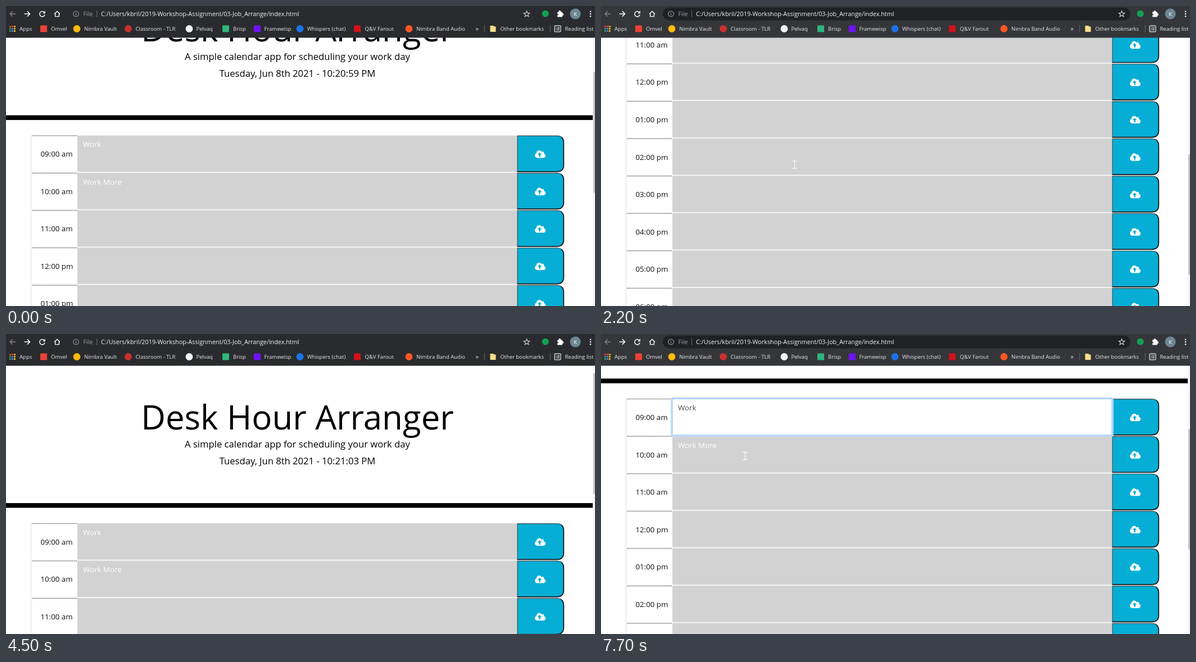
Write an HTML page that moves like this. It is 1048x534 px and loops after 8 s.

```html
<!DOCTYPE html>
<html lang="en">
<head>
<meta charset="utf-8">
<title>Day planner</title>
<style>
  html, body { margin: 0; width: 100%; height: 100%; overflow: hidden; background: #fff; }
  svg { display: block; width: 1048px; height: 534px; font-family: "Open Sans", "Noto Sans", sans-serif; }
</style>
</head>
<body>
<svg id="stage" viewBox="0 0 1048 534"></svg>
<script>
const LOOP = 8000, STEP = 100;
const ROW = 66.55, FIRST_ROW = 337, MID = 518.5;

const rect = (x, y, w, h, fill, more = '') =>
  `<rect x="${x}" y="${y}" width="${w}" height="${h}" fill="${fill}" ${more}/>`;
const circle = (x, y, r, fill, more = '') =>
  `<circle cx="${x}" cy="${y}" r="${r}" fill="${fill}" ${more}/>`;
const line = (d, color, width, more = '') =>
  `<path d="${d}" fill="none" stroke="${color}" stroke-width="${width}" ${more}/>`;
const text = (x, y, size, fill, str, more = '') =>
  `<text x="${x}" y="${y}" font-size="${size}" fill="${fill}" ${more}>${str}</text>`;
const centered = (y, size, str, id) =>
  text(MID, y, size, '#000', str, `text-anchor="middle" id="${id}"`);

// Planner rows
const cloud = `<g id="cloud" fill="#fff" transform="translate(941 25.6) scale(.0297)">
  <circle cx="256" cy="192" r="160"/><circle cx="448" cy="192" r="96"/>
  <circle cx="144" cy="336" r="144"/><circle cx="512" cy="352" r="128"/>
  <rect x="144" y="230" width="368" height="250"/>
  <path d="M288 146L414 288H328V416H248V288H162z" fill="#06aed5"/></g>`;

const saveButton =
  `<path d="M910 .6H980Q992.4 .6 992.4 13V52Q992.4 64.4 980 64.4H910z" fill="#06aed5" stroke="#3b4a4f" stroke-width="1.2"/>` +
  line('M909.6 64.4H980Q992.3 64.4 992.3 52V13Q992.3 6 988 3', '#10181b', 1.7) + cloud;

function hourLabel(i) {
  const h = 9 + i;
  return String(h > 12 ? h - 12 : h).padStart(2, '0') + ':00 ' + (h < 12 ? 'am' : 'pm');
}

function row(i) {
  const note = ['Work', 'Work More'][i] || '';
  return `<g transform="translate(0 ${FIRST_ROW + i * ROW})">` +
    line('M44.6 1V64.6', '#dcdcdc', 0.9) +
    line('M46 .4H127', '#111', 0.9, 'stroke-dasharray="1.7 1.2"') +
    text(61.4, 37.8, 13.31, '#111', hourLabel(i)) +
    rect(127, 0, 782, 64.6, '#d2d2d2', `id="field${i}"`) +
    line('M45 65.4H909', '#ececec', 0.9) +
    text(137, 20.7, 13.31, '#fff', note, `id="note${i}"`) +
    saveButton.replace('id="cloud" ', '') + '</g>';
}

const focusRing = `<g id="ring" fill="none" transform="translate(0 ${FIRST_ROW})">` +
  rect(125.6, -1.2, 784.8, 67.2, 'none', 'stroke="#bfdeff" stroke-width="2.8" rx="1"') +
  rect(127, 0.2, 782, 64.4, 'none', 'stroke="#80bdff" stroke-width=".9"') + '</g>';

const page = '<g id="page">' +
  centered(169.5, 59.9, 'Desk Hour Arranger', 'heading') +
  centered(202.4, 16.64, 'A simple calendar app for scheduling your work day', 'lead') +
  centered(232.4, 16.64, '', 'clock') +
  rect(0, 301, 1044, 8.4, '#000') +
  Array.from({ length: 10 }, (_, i) => row(i)).join('') + focusRing + '</g>';

// Browser bars
const INK = '#e8eaed', DIM = '#9aa0a6';

const bookmarks = [
  [80, 'Omvel', 67, 's', '#ea4335'],
  [139, 'Nimbra Vault', 126, 'c', '#fbbc04'],
  [230.5, 'Classroom - TLR', 217.5, 'c', '#c9302c'],
  [338.5, 'Pelvaq', 326, 'c', '#f5f5f5'],
  [404, 'Brisp', 391, 's', '#2eb67d'],
  [459.5, 'Framewisp', 447, 's', '#7012f5'],
  [536, 'Whispers (chat)', 523, 'c', '#1a73e8'],
  [638.5, 'Q&amp;V Farout', 625, 's', '#d0111b'],
  [730, 'Nimbra Band Audio', 717, 'c', '#ff5722']
];

function bookmark([x, name, cx, kind, color]) {
  const icon = kind === 'c' ? circle(cx, 40.5, 6.4, color) : rect(cx - 6, 34.5, 12, 12, color, 'rx="1"');
  return icon + text(x, 43.8, 9.5, INK, name);
}

function appsGrid() {
  const colors = ['#ea4335', '#ea4335', '#fbbc04', '#34a853', '#4285f4', '#fbbc04', '#34a853', '#4285f4', '#fbbc04'];
  return colors.map((c, i) => rect(6 + (i % 3) * 4, 35.2 + Math.floor(i / 3) * 4, 2.8, 2.8, c)).join('');
}

const star = Array.from({ length: 10 }, (_, i) => {
  const a = i * Math.PI / 5 - Math.PI / 2, r = i % 2 ? 2.4 : 5.6;
  return (926.5 + r * Math.cos(a)).toFixed(1) + ' ' + (14.3 + r * Math.sin(a)).toFixed(1);
}).join('L');

const chrome =
  rect(0, 0, 1048, 56.5, '#35363a', 'id="bar"') +
  rect(110, 2.8, 832, 22.6, '#202124', 'rx="11.3" id="pill"') +
  line('M17 14H7M11.6 9.4L7 14L11.6 18.6', '#85878b', 1.4) +
  line('M32.5 14H42.5M37.9 9.4L42.5 14L37.9 18.6', '#fff', 1.5) +
  line('M68 11A4.7 4.7 0 1 0 69.1 15.4', '#fff', 1.5) +
  '<path d="M69.8 8.6V13.2H65.2z" fill="#fff"/>' +
  line('M86 14.3L91 9.4L96 14.3M87.6 13.4V18.6H94.4V13.4', '#fff', 1.4) +
  circle(124.5, 14, 4.8, 'none', `stroke="${DIM}" stroke-width="1.1"`) +
  line('M124.5 13.2V16.6M124.5 11.2V12.3', DIM, 1.1) +
  text(137.5, 17.9, 10.8, DIM, 'File') +
  line('M161.5 8V20', '#6b6e73', 1) +
  text(169, 17.9, 10.8, '#f1f3f4', 'C:/Users/kbril/2019-Workshop-Assignment/03-Job_Arrange/index.html') +
  line(`M${star}Z`, '#d0d2d6', 1.1) +
  circle(959.7, 13.7, 6, '#12a152') +
  rect(981, 10.5, 9, 9, '#fff', 'rx="1"') + circle(985.3, 10, 1.9, '#fff') + circle(990.3, 15, 1.9, '#fff') +
  circle(981.4, 15.2, 1.3, '#35363a') +
  circle(1013, 14, 9.6, '#6b8791') + text(1013, 17.6, 9.8, '#fff', 'K', 'text-anchor="middle"') +
  [9.8, 14, 18.2].map(y => circle(1040, y, 1.3, '#fff')).join('') +
  appsGrid() + text(24, 43.8, 9.6, INK, 'Apps') +
  bookmarks.map(bookmark).join('') +
  text(835.5, 43.8, 11, INK, '»') +
  line('M851.5 34V47M968.5 34V47', '#5f6368', 1) +
  '<path d="M861.5 35H867L868.5 36.5H871.5V46H861.5z" fill="#fbe08a"/>' +
  text(879.5, 43.8, 9.45, INK, 'Other bookmarks') +
  rect(976, 35.2, 11, 10.6, 'none', `stroke="${INK}" stroke-width="1.2" rx="1"`) +
  line('M978 38.2H979.4M978 40.5H979.4M978 42.8H979.4M980.4 38.2H985M980.4 40.5H985M980.4 42.8H985', INK, 1.1) +
  text(994.5, 43.8, 9.5, INK, 'Reading list');

const scrollbar = rect(1044.4, 56.5, 3.6, 478, '#f4f4f4') +
  rect(1045, 70, 3, 214.6, '#c4c4c4', 'id="thumb"');

const pointers =
  line('M-4 -6.7H-1Q0 -6.7 0 -5.7Q0 -6.7 1 -6.7H4M0 -6V6M-4 6.7H-1Q0 6.7 0 5.7Q0 6.7 1 6.7H4', '#fff', 1.2, 'id="beam"') +
  '<path id="arrow" d="M0 0V13L3 10.2L5 14.8L7 14L5 9.6H9z" fill="#fff" stroke="#000" stroke-width=".8"/>';

document.getElementById('stage').innerHTML =
  rect(0, 0, 1048, 534, '#fff') + page + scrollbar + chrome + pointers;

const el = id => document.getElementById(id);
const move = (id, x, y) => el(id).setAttribute('transform', `translate(${x} ${y})`);
const show = (id, on) => el(id).setAttribute('visibility', on ? 'visible' : 'hidden');

// Keys are [time, value, ...], linear in between
const scrollKeys = [
  [1600, 106.5], [1700, 145], [1800, 217], [2100, 395], [2200, 434], [2400, 439],
  [2500, 439], [2600, 405], [2700, 405], [2800, 190], [2900, 55], [3000, 18], [3200, 0],
  [4900, 0], [5000, 30], [5300, 190], [5400, 214], [5500, 221.7]
];
const pointerKeys = [
  [300, 30, 12], [1100, 324, 282.5], [1200, 339, 282.5], [1400, 339, 282.5], [1500, 340.5, 282.5],
  [1800, 340.5, 282.5], [2200, 344.5, 282.5], [2900, 345.5, 280.5], [3900, 347, 280.5],
  [4300, 520, 227], [4400, 520, 227], [4500, 550.5, 227], [4800, 640, 240], [5500, 578, 299],
  [5600, 578, 299], [6400, 180, 190.5], [6500, 180, 189], [6600, 181, 158], [6700, 181, 158],
  [7000, 174.5, 128.5], [7200, 174.5, 128.5], [7700, 256.5, 217]
];

function at(keys, t) {
  const n = keys.findIndex(k => k[0] >= t);
  if (n < 0) return keys[keys.length - 1].slice(1);
  if (n === 0) return keys[0].slice(1);
  const a = keys[n - 1], b = keys[n], p = (t - a[0]) / (b[0] - a[0]);
  return a.slice(1).map((v, i) => v + (b[i + 1] - v) * p);
}

function draw(t) {
  const [scroll] = at(scrollKeys, t);
  move('page', 0, -scroll);
  move('thumb', 0, scroll * 0.447);

  // The bar is one flat tone while the heading is in view
  const flat = scroll < 130;
  el('bar').setAttribute('fill', flat ? '#2a2b2e' : '#35363a');
  show('pill', !flat);

  const sec = 59 + Math.floor((t + 200) / 1000);
  el('clock').textContent = 'Tuesday, Jun 8th 2021 - 10:' + (20 + Math.floor(sec / 60)) + ':' +
    String(sec % 60).padStart(2, '0') + ' PM';

  const focused = t >= 6800;
  el('field0').setAttribute('fill', focused ? '#fff' : '#d2d2d2');
  el('note0').setAttribute('fill', focused ? '#495057' : '#fff');
  el('ring').setAttribute('opacity', Math.max(0, Math.min(1, (t - 6750) / 200)));

  const [x, y] = at(pointerKeys, t);
  const asArrow = t < 1200 && y < FIRST_ROW - scroll;
  show('arrow', t >= 300 && asArrow);
  show('beam', t >= 300 && !asArrow);
  move('arrow', x, y);
  move('beam', x, y);
}

const start = performance.now();
function tick() {
  const t = (performance.now() - start) % LOOP;
  draw(Math.floor(t / STEP) * STEP);
  requestAnimationFrame(tick);
}
tick();
</script>
</body>
</html>
```
